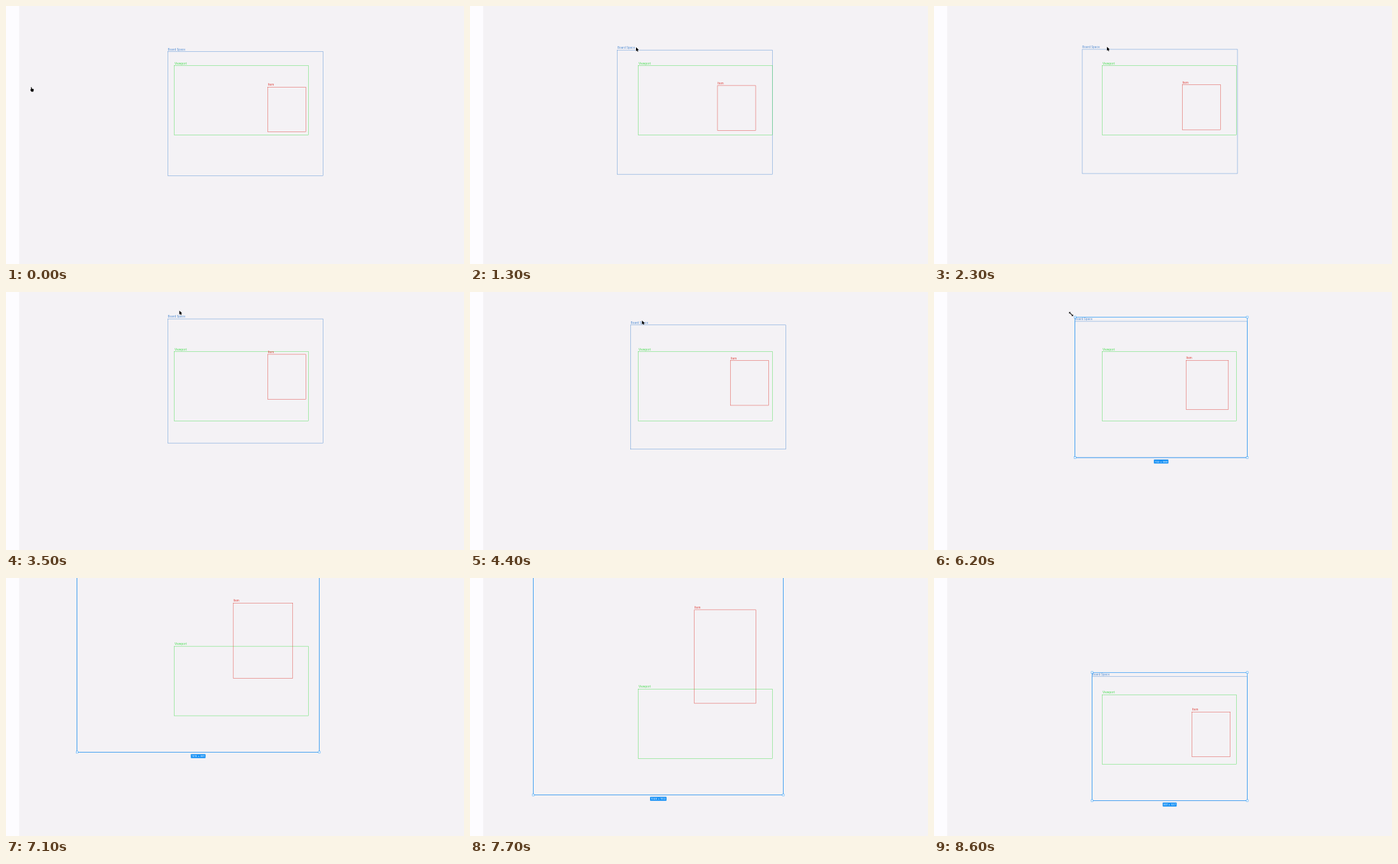
Recreate the animation shown at these times as an HTML page with a canvas. Size 720 by 405 pixels, loop 9900 ms.

```html
<!DOCTYPE html>
<html lang="en">
<head>
<meta charset="utf-8">
<title>Board space</title>
<style>
  html, body { margin: 0; width: 100%; height: 100%; overflow: hidden; background: #f4f2f5; }
  canvas { display: block; width: 720px; height: 405px; }
</style>
</head>
<body>
<canvas id="stage"></canvas>
<script>
const LOOP = 9900, STEP = 100;
const BLUE = '#4585d0', GREEN = '#3fdc48', RED = '#dc332c', SELECT = '#1490f5';
const RIGHT = 492.5, LABEL_ROW = 6.5, UNITS = 8 / 3;

const canvas = document.getElementById('stage');
const ctx = canvas.getContext('2d');
const ratio = window.devicePixelRatio || 1;
canvas.width = 720 * ratio;
canvas.height = 405 * ratio;
ctx.scale(ratio, ratio);

const progress = (t, from, to) => Math.min(1, Math.max(0, (t - from) / (to - from)));
const smooth = k => (1 - Math.cos(Math.PI * k)) / 2;
const lerp = (a, b, k) => a + (b - a) * k;
const wave = (t, period) => 2 * Math.PI * t / period;

const scrollAt = t => 89.5 * progress(t, 6980, 7780);

// Sideways shaking, then a damped bounce up and down.
function draggedBoard(t) {
  const shake = smooth(progress(t, 350, 1900)) * (1 - smooth(progress(t, 3000, 3380)));
  const x = 254.3 + shake * (31 * Math.sin(wave(t - 490, 930)) - 11) - 5.8 * progress(t, 3380, 5200) ** 2;
  const y = t < 3700
    ? lerp(71.5 - 3.5 * shake, 30, smooth(progress(t, 3150, 3700)))
    : 65 - 35 * (1 - progress(t, 3700, 5200)) * Math.cos(wave(t - 3700, 800));
  return { x, y, w: 244, h: 195 };
}

// The top left corner is pulled outwards, then let back in.
function resizedBoard(t) {
  const pull = progress(t, 5980, 7200), release = smooth(progress(t, 7900, 8600));
  const x = 248.5 - 149 * pull * (1 - release);
  const y = lerp(65 - 131.5 * pull ** 1.13, 154.8, release);
  return { x, y, w: RIGHT - x, h: 260 + scrollAt(t) - y };
}

const boardAt = t => t < 5500 ? draggedBoard(t) : resizedBoard(t);

function frame(x, y, w, h, color, width = 0.45) {
  ctx.strokeStyle = color;
  ctx.lineWidth = width;
  ctx.strokeRect(x, y, w, h);
}

function text(string, x, y, color, size = 4.5) {
  ctx.font = `${size}px Inter, sans-serif`;
  ctx.fillStyle = color;
  ctx.fillText(string, x, y);
}

function labelled(name, x, y, w, h, color) {
  frame(x, y, w, h, color);
  text(name, x + 0.3, y - 2, color);
}

function selection({ x, y, w, h }) {
  const top = y - LABEL_ROW, tall = h + LABEL_ROW, bottom = y + h;
  frame(x, top, w, tall, SELECT, 0.7);
  for (const hx of [x, x + w]) {
    for (const hy of [top, bottom]) {
      ctx.fillStyle = '#fff';
      ctx.fillRect(hx - 1.5, hy - 1.5, 3, 3);
      frame(hx - 1.5, hy - 1.5, 3, 3, SELECT);
    }
  }
  const size = `${Math.round(w * UNITS)} × ${Math.round(tall * UNITS)}`;
  ctx.font = '4.1px Inter, sans-serif';
  const width = ctx.measureText(size).width + 3, left = x + w / 2 - width / 2;
  ctx.fillStyle = SELECT;
  ctx.beginPath();
  ctx.roundRect(left, bottom + 3, width, 6.2, 0.7);
  ctx.fill();
  text(size, left + 1.5, bottom + 7.6, '#fff', 4.1);
}

const shapes = {
  arrow: new Path2D('M0 0 4.4 4.3 2.6 4.5 3.5 6.4 2.4 6.9 1.5 5 0 6.2Z'),
  hand: new Path2D('M-1.2-3.3Q-.5-4 0-3.2L.3-1 2.6-.7Q3.3-.5 3.1.5L2.5 3.6H-.7L-2.3.7Q-2.4-.3-1.2.3Z'),
  resize: new Path2D('M-3.2-3.2H-.6L-1.4-2.2 2.2 1.4 3.2.6V3.2H.6L1.4 2.2-2.2-1.4-3.2-.6Z')
};

function cursor(shape, x, y) {
  ctx.save();
  ctx.translate(x, y);
  ctx.strokeStyle = '#fff';
  ctx.lineWidth = 0.6;
  ctx.stroke(shapes[shape]);
  ctx.fillStyle = '#000';
  ctx.fill(shapes[shape]);
  ctx.restore();
}

function drawCursor(t) {
  // The board trails the pointer slightly.
  if (t < 100) {
    cursor('hand', 40.5, 131);
  } else if (t < 400) {
    const k = progress(t, 0, 200);
    cursor('arrow', lerp(105, 274.5, k), lerp(119, 91, k));
  } else if (t < 5500) {
    const next = draggedBoard(t + STEP), leave = progress(t, 5000, 5300);
    cursor('arrow', next.x + lerp(18.3, 1.5, leave), next.y + lerp(-4, -2, leave));
  } else if (t < 8600) {
    const next = resizedBoard(t + STEP / 2);
    cursor('resize', next.x, next.y - LABEL_ROW);
  }
}

function draw(t) {
  ctx.fillStyle = '#f4f2f5';
  ctx.fillRect(0, 0, 720, 405);
  ctx.fillStyle = '#fdfcff';
  ctx.fillRect(0, 0, 20.7, 405);

  const board = boardAt(t), { x, y, w, h } = board;
  labelled('Board Space', x, y, w, h, BLUE);
  labelled('Viewport', 264.7, 93.7 + scrollAt(t), 210.8, 109, GREEN);
  labelled('Item', x + w * 0.6445, y + h * 0.286, w * 0.246, h * 0.361, RED);
  if (t >= 6000) selection(board);
  drawCursor(t);
}

function tick() {
  const t = performance.now() % LOOP;
  draw(Math.floor(t / STEP) * STEP);
  requestAnimationFrame(tick);
}
tick();
</script>
</body>
</html>
```
